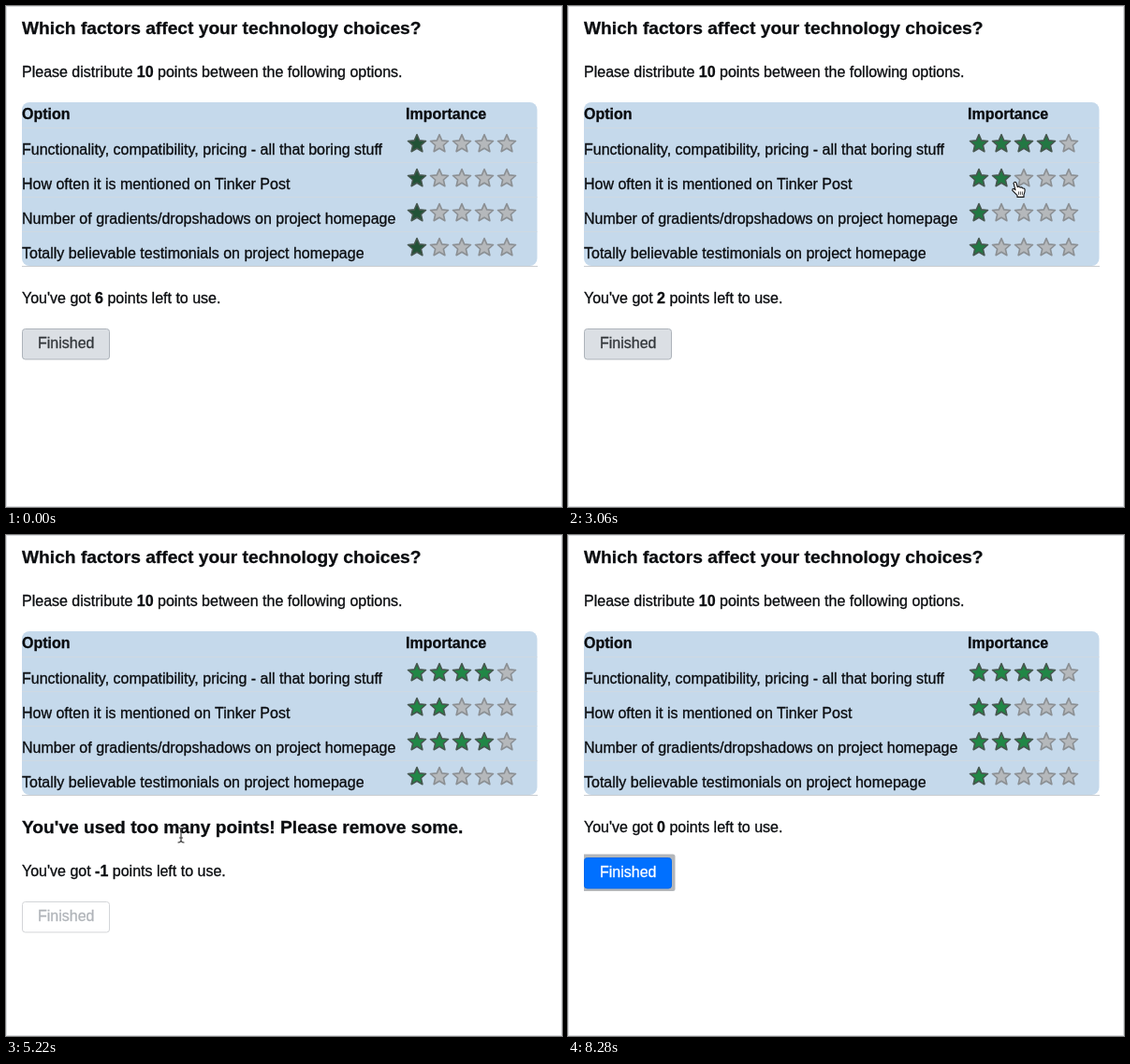
Animation, 594 px wide and 536 px high, one loop 8.46 s. Source, as an HTML page:

```html
<!DOCTYPE html>
<html lang="en">
<head>
<meta charset="utf-8">
<title>Points survey</title>
<style>
html, body { margin: 0; height: 100%; overflow: hidden; background: #fff; }
svg { display: block; font: 16px "Liberation Sans", Arial, sans-serif; }
text { stroke-width: .3px; }
.b { font-weight: bold; }
.h { font-weight: bold; font-size: 19.2px; }
</style>
</head>
<body>
<svg id="stage" width="594" height="536" viewBox="0 0 594 536"></svg>
<script>
const LOOP = 8460, STEP = 60;
const WARN = 4200, FIXED = 6240, CLOSED = 6740, PRESS = 7920;
const CLICKS = [2040, 3060, WARN, FIXED];
const ROW = 37, COL = 24, LEFT = 427, TOP = 130;
const stage = document.getElementById('stage');

const options = [
  'Functionality, compatibility, pricing - all that boring stuff',
  'How often it is mentioned on Tinker Post',
  'Number of gradients/dropshadows on project homepage',
  'Totally believable testimonials on project homepage'
];

// Pointer moves: begin, end, x, y; it rests in between
const moves = [
  [240, 780, 557, 164],
  [1020, 1620, 505, 149],
  [2040, 2640, 474, 188],
  [3060, 3180, 479, 192],
  [3540, 4020, 512, 223],
  [4740, 5220, 187, 320],
  [5220, 6000, 482, 222],
  [6300, 6840, 76, 379],
  [6840, 7080, 66, 360],
  [7980, 8280, -14, 536]
];

const clamp = v => Math.max(0, Math.min(1, v));
const ease = u => u * u * (3 - 2 * u);

function pointerAt(t) {
  let x = 564, y = 215;
  for (const [begin, end, toX, toY] of moves) {
    const k = ease(clamp((t - begin) / (end - begin)));
    x += (toX - x) * k;
    y += (toY - y) * k;
  }
  return { x, y };
}

// Row and rating under a point, or null
function ratingAt({ x, y }) {
  const row = Math.floor((y - TOP) / ROW), n = Math.floor((x - LEFT) / COL) + 1;
  return row >= 0 && row < 4 && n > 0 && n <= 5 ? { row, n } : null;
}

function ratingsAt(t) {
  const ratings = options.map(() => 1);
  for (const at of CLICKS) {
    if (t < at) break;
    const { row, n } = ratingAt(pointerAt(at));
    ratings[row] = n;
  }
  return ratings;
}

const text = (x, y, s, cls = '', fill = '#0b0d10', alpha = 1) =>
  `<text x="${x}" y="${y}" class="${cls}" fill="${fill}" stroke="${fill}" opacity="${alpha}">${s}</text>`;

const bold = s => `<tspan class="b">${s}</tspan>`;

const starPoints = Array.from({ length: 10 }, (_, i) => {
  const r = i % 2 ? 4.6 : 10, a = i * Math.PI / 5;
  return (r * Math.sin(a)).toFixed(2) + ',' + (-r * Math.cos(a)).toFixed(2);
}).join(' ');

function star(col, row, fill, edge) {
  return `<polygon points="${starPoints}" transform="translate(${LEFT + 12 + COL * col} ${147.6 + ROW * row})"
    fill="${fill}" stroke="${edge}" stroke-width="1.6" stroke-linejoin="round"/>`;
}

const shapes = {
  arrow: '<path d="M0 0V14.5L3.4 11.4L5.8 16.6L8.4 15.4L6.1 10.4H10.6Z" fill="#111" stroke="#fff" stroke-width="1.2"/>',
  hand: `<path d="M2 1.6Q3.5 -1 5 1.4L6.2 5.6Q8 4.5 9 6.2Q10.8 5.3 11.7 7Q14 6.6 14.1 8.6Q14.2 11.5 13 14V16.4H6V14.6L.8 9.4Q.6 6.8 2.8 7.8L4 8.8Z"
    fill="#fff" stroke="#111" stroke-width="1.1" stroke-linejoin="round"/>
    <path d="M7.4 10.5V14M9.4 10.5V14M11.4 10.5V14" stroke="#222" stroke-width=".8"/>`,
  beam: '<path d="M-3.5 -7Q-.5 -7 0 -5Q.5 -7 3.5 -7M0 -5V7M-3.5 9Q-.5 9 0 7Q.5 9 3.5 9M-2 4H2" fill="none" stroke="#444" stroke-width="1.2"/>'
};

function button(y, state) {
  const [fill, edge, ink] = {
    off: ['#fff', '#d3d5d8', '#b0b4b9'],
    on: ['#dbdfe4', '#adb3ba', '#33373b'],
    down: ['#0070ff', '#0068ee', '#fff']
  }[state];
  const glow = state === 'down'
    ? `<path d="M17 ${y - 3.5}h95q2.5 0 2.5 2.5v34.5q0 2.5 -2.5 2.5h-95z" fill="#b3b6ba"/>` : '';
  return glow + `<rect x="17.5" y="${y + .5}" width="93" height="32.5" rx="3" fill="${fill}" stroke="${edge}"/>` +
    text(34, y + 21, 'Finished', '', ink);
}

function draw(t) {
  const ratings = ratingsAt(t);
  const left = 10 - ratings.reduce((a, b) => a + b);
  const p = pointerAt(t), hover = t >= 240 && ratingAt(p);
  const overText = p.x > 17 && p.x < 490 && p.y > 300 && p.y < 326;
  const shape = hover ? 'hand' : overText ? 'beam' : 'arrow';

  const open = t >= WARN && t < CLOSED, shift = open ? 47 : 0;
  const alpha = clamp((t - WARN) / 360) - clamp((t - FIXED) / 500);

  // The green brightens until the warning appears
  const k = clamp(t / WARN);
  const green = `hsl(${146 - 4 * k} ${42 + 19 * k}% ${23 + 10 * k}%)`;

  let out = '<rect x=".5" y=".5" width="593" height="535" fill="#fff" stroke="#d9dbde"/>' +
    text(17, 30, 'Which factors affect your technology choices?', 'h') +
    text(17, 76, `Please distribute ${bold(10)} points between the following options.`) +
    '<rect x="17" y="103" width="550.5" height="175" rx="8" fill="#c5d9eb"/>' +
    '<path d="M17 278.5H568" stroke="#c9ccd0"/>' +
    text(17, 121, 'Option', 'b') + text(LEFT, 121, 'Importance', 'b');

  options.forEach((label, row) => {
    out += `<path d="M17 ${TOP + .5 + ROW * row}H567.5" stroke="#cfd9e2"/>` + text(17, 159 + ROW * row, label);
    const n = hover && hover.row === row ? hover.n : ratings[row];
    for (let c = 0; c < 5; c++) {
      out += c < n ? star(c, row, green, '#46564e') : star(c, row, '#b5b8bb', '#8b8f93');
    }
  });

  if (open) out += text(17, 319, "You've used too many points! Please remove some.", 'h', '#0b0d10', alpha);
  out += text(17, 318 + shift, `You've got ${bold(left)} points left to use.`) +
    button(345 + shift, left < 0 ? 'off' : t >= PRESS ? 'down' : 'on');
  if (t >= 240) out += `<g transform="translate(${p.x} ${p.y})">${shapes[shape]}</g>`;
  stage.innerHTML = out;
}

let last = -1;
const start = performance.now();
function tick() {
  const t = Math.floor((performance.now() - start) % LOOP / STEP) * STEP;
  if (t !== last) draw(last = t);
  requestAnimationFrame(tick);
}
tick();
</script>
</body>
</html>
```
